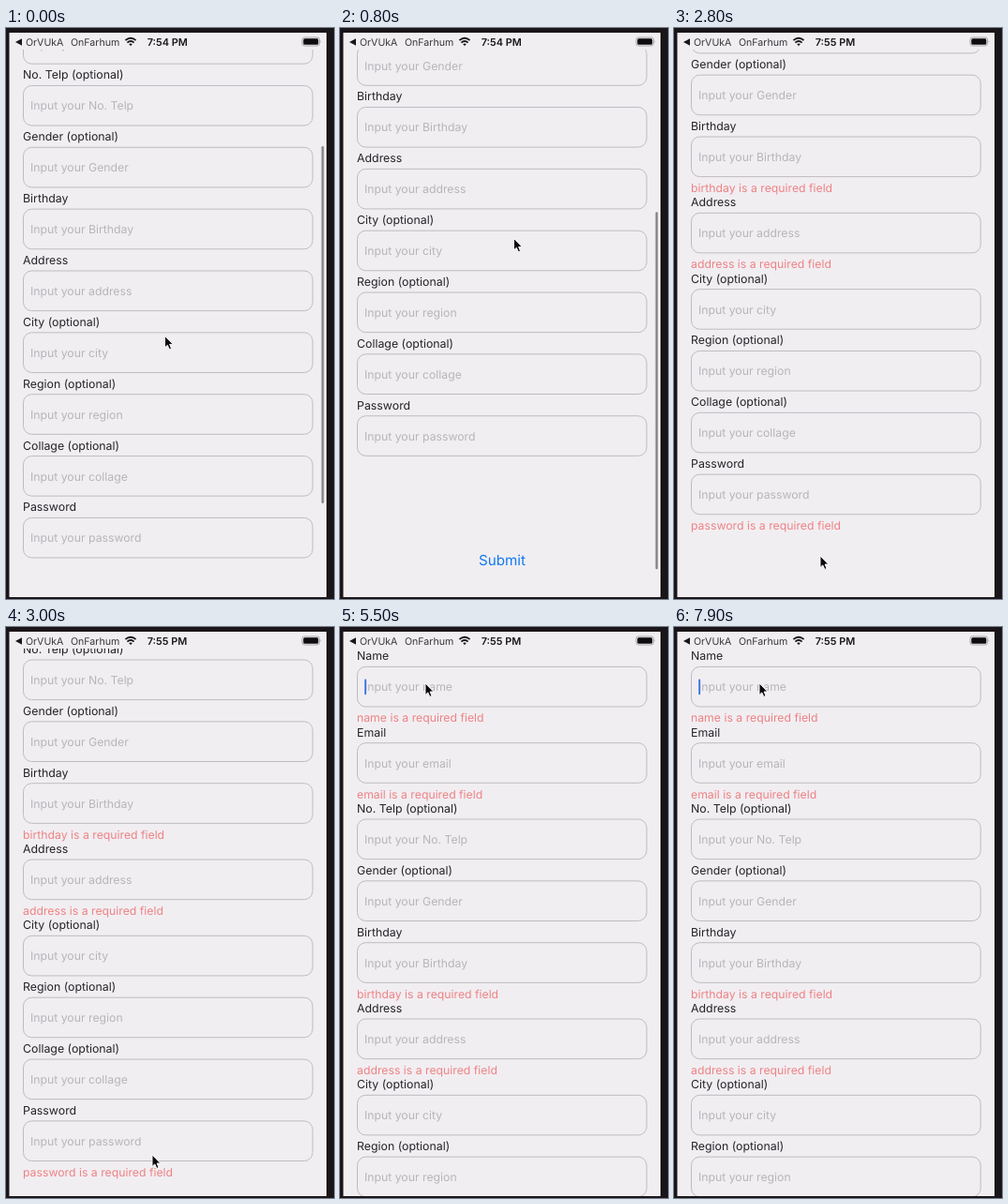
Recreate the animation shown at these times as an HTML page. Size 350 px wide and 609 px high, loop 8 s.

```html
<!DOCTYPE html>
<html lang="en">
<head>
<meta charset="utf-8">
<title>Form validation</title>
<style>
  html, body { margin: 0; width: 100%; height: 100%; overflow: hidden; background: #1a1519; }
  svg { display: block; width: 350px; height: 609px; font: 12.25px Inter, "Liberation Sans", sans-serif; text-rendering: geometricPrecision; }
  .label { font-size: 12.35px; fill: #262428; }
  .hint { fill: #b8b5b9; }
  .error { fill: #ee8384; }
  .box { fill: none; stroke: #bfbbc0; }
  .status { font-size: 10.6px; fill: #39363b; }
  .clock { font-size: 10.9px; font-weight: 600; fill: #19171a; }
  .submit { font-size: 15.2px; fill: #0f78ee; }
</style>
</head>
<body>
<svg viewBox="0 0 350 609">
  <defs>
    <clipPath id="view"><rect x="3.5" y="23" width="338.5" height="584"/></clipPath>
  </defs>
  <rect width="350" height="609" fill="#1a1519"/>
  <rect x="3.5" y="5" width="338.5" height="602" fill="#f1eef2"/>
  <g clip-path="url(#view)">
    <g id="form"></g>
    <rect id="bar" x="336.6" width="2.6" height="381" rx="1.3" fill="#8b898c"/>
  </g>
  <path d="M10 15L17 11.2V18.8Z" fill="#19171a"/>
  <text class="status" x="21" y="18.8">OrVUkA</text>
  <text class="status" x="69" y="18.8">OnFarhum</text>
  <g fill="none" stroke="#19171a" stroke-width="1.8">
    <path d="M127.4 13.2Q133 8.2 138.6 13.2M129.4 15.6Q133 12.4 136.6 15.6"/>
    <path d="M131.2 17L133 19.2L134.8 17Q133 15.8 131.2 17Z" fill="#19171a" stroke="none"/>
  </g>
  <text class="clock" id="clock" x="150.7" y="18.8"></text>
  <rect x="316" y="10" width="18.6" height="9" rx="2.6" fill="none" stroke="#a29fa3" stroke-width=".9"/>
  <rect x="317.3" y="11.3" width="16" height="6.4" rx="1.5" fill="#0d0c0e"/>
  <path d="M335.6 13Q337.2 14.5 335.6 16Z" fill="#a29fa3"/>
  <path id="pointer" d="M0 0V12.4L2.8 9.9L4.9 14.4L7 13.5L5.1 9H8.8Z" fill="#0b0a0c" stroke="#fff" stroke-width=".9" stroke-linejoin="round"/>
</svg>
<script>
const LOOP = 8000;
const FIRST_TOP = 42.4, PITCH = 65.85, ERROR_HEIGHT = 15.45;
const ERRORS_AT = 2750, CLOCK_AT = 2000, PRESS_AT = 2560, FOCUS_AT = 5450;

const $ = id => document.getElementById(id);
const clamp = v => Math.min(1, Math.max(0, v));
const ramp = (t, from, to) => clamp((t - from) / (to - from));
const smooth = x => x * x * (3 - 2 * x);

function add(parent, tag, attrs, text = "") {
  const el = document.createElementNS("http://www.w3.org/2000/svg", tag);
  for (const key in attrs) el.setAttribute(key, attrs[key]);
  el.textContent = text;
  return parent.appendChild(el);
}

// Monotone cubic curve through [time, value] keys.
function curve(keys) {
  const slope = i => (keys[i + 1][1] - keys[i][1]) / (keys[i + 1][0] - keys[i][0]);
  const tangents = keys.map((_, i) => {
    if (i === 0) return slope(0) * 0.7;
    if (i === keys.length - 1) return 0;
    const a = slope(i - 1), b = slope(i);
    return a * b > 0 ? 2 * a * b / (a + b) : 0;
  });
  return t => {
    if (t >= keys.at(-1)[0]) return keys.at(-1)[1];
    const i = keys.findIndex((_, k) => t < keys[k + 1][0]);
    const [t0, v0] = keys[i], [t1, v1] = keys[i + 1];
    const d = t1 - t0, x = (t - t0) / d, y = 1 - x;
    return v0 + (v1 - v0) * smooth(x) + d * x * y * (tangents[i] * y - tangents[i + 1] * x);
  };
}

const path = [
  [0, 169.5, 328.5], [400, 172.5, 298.5], [800, 185.5, 224.5], [1000, 187, 216], [1500, 187, 216],
  [2300, 156, 563], [3920, 156, 563], [4400, 96, 93], [4500, 96, 93], [4750, 91, 60]
];
const pointerX = curve(path.map(([t, x]) => [t, x]));
const pointerY = curve(path.map(([t, , y]) => [t, y]));
const dragScroll = curve([[0, 112.6], [400, 139.1], [800, 221.3], [950, 222.3], [1300, 220.7]]);

const fields = [
  ["Name", "name", true],
  ["Email", "email", true],
  ["No. Telp (optional)", "No. Telp"],
  ["Gender (optional)", "Gender"],
  ["Birthday", "Birthday", true],
  ["Address", "address", true],
  ["City (optional)", "city"],
  ["Region (optional)", "region"],
  ["Collage (optional)", "collage"],
  ["Password", "password", true]
].map(([label, name, required]) => {
  const group = add($("form"), "g", {});
  add(group, "text", { class: "label", x: 18, y: -7 }, label);
  add(group, "rect", { class: "box", x: 18.5, y: 0, width: 308.7, height: 42.6, rx: 9 });
  add(group, "text", { class: "hint", x: 26, y: 26 }, "Input your " + name);
  const error = required &&
    add(group, "text", { class: "error", x: 18, y: 59 }, name.toLowerCase() + " is a required field");
  return { group, error };
});
const caret = add(fields[0].group, "rect", { x: 26.2, y: 13.2, width: 1.9, height: 16.6, rx: 0.9, fill: "#3f74e6" });
const submit = add($("form"), "text", { class: "submit", x: 173, "text-anchor": "middle" }, "Submit");

function caretOpacity(t) {
  if (t < FOCUS_AT) return 0;
  if (t < 5900) return 1;
  const phase = t % 1000;
  return 1 - ramp(phase, 0, 150) + ramp(phase, 350, 550);
}

function draw(t) {
  const failed = t >= ERRORS_AT;
  const scroll = dragScroll(t) * (1 - smooth(ramp(t, 2830, 3380)));

  let top = FIRST_TOP;
  for (const { group, error } of fields) {
    group.setAttribute("transform", `translate(0 ${top})`);
    if (error) error.setAttribute("opacity", failed ? 1 : 0);
    top += PITCH + (error && failed ? ERROR_HEIGHT : 0);
  }
  submit.setAttribute("y", top - PITCH + 159.6);
  submit.setAttribute("opacity", t >= PRESS_AT && !failed ? 0.3 : 1);
  $("form").setAttribute("transform", `translate(0 ${-scroll})`);

  $("bar").setAttribute("y", Math.min(197, 126 + (scroll - 112.6) * 0.646));
  $("bar").setAttribute("opacity", 1 - ramp(t, 1750, 2000));
  $("clock").textContent = t < CLOCK_AT ? "7:54 PM" : "7:55 PM";
  caret.setAttribute("opacity", caretOpacity(t));
  $("pointer").setAttribute("transform", `translate(${pointerX(t)} ${pointerY(t)})`);
}

const start = performance.now();
function tick() {
  draw((performance.now() - start) % LOOP);
  requestAnimationFrame(tick);
}
tick();
</script>
</body>
</html>
```
